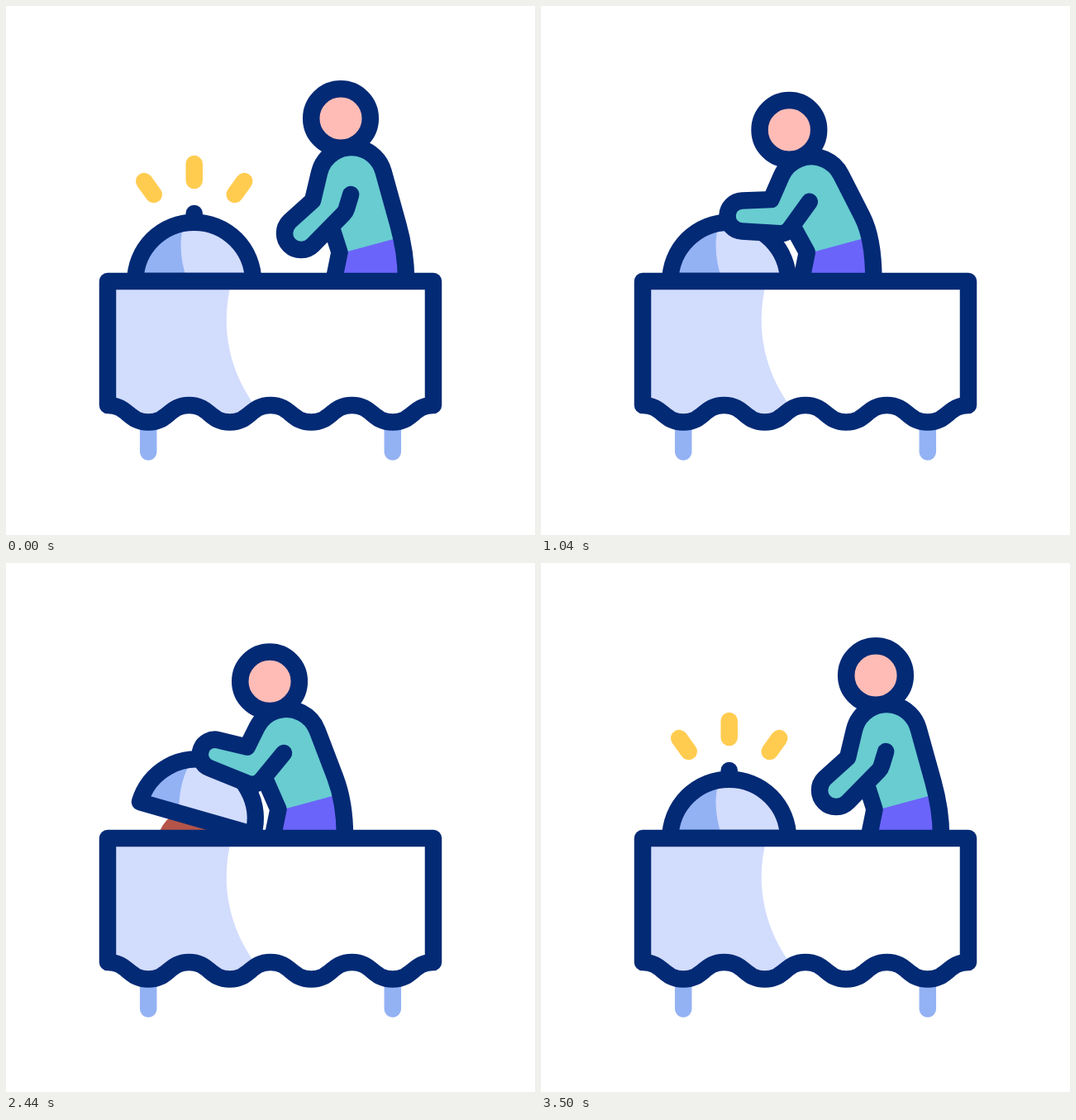
Recreate the animation shown at these times as an HTML page with a canvas. Size 640 px wide and 640 px high, loop 3600 ms.

```html
<!DOCTYPE html>
<html lang="en">
<head>
<meta charset="utf-8">
<title>Buffet</title>
<style>
  html, body { margin: 0; width: 100%; height: 100%; overflow: hidden; background: #fff; }
  canvas { display: block; width: 640px; height: 640px; }
</style>
</head>
<body>
<canvas id="stage" width="640" height="640"></canvas>
<script>
(() => {
const ctx = document.getElementById('stage').getContext('2d');
const LOOP = 3600, END = 3500, GRAB = 1080, RELEASE = 2700;
const LINE = 20.5, MAX_LEAN = 14, RAD = Math.PI / 180;
const NAVY = '#032a75', PALE = '#d2dcfd', BLUE = '#93b2f4', GREEN = '#68ccd1',
      PURPLE = '#6b64fa', SKIN = '#ffbcb6', YELLOW = '#ffcc50', BROWN = '#b55449';

// time, hip x, forward lean, arm direction in degrees
const poses = [
  [0, 484, 0, 133.6],
  [580, 433, 7.5, 144.7],
  [GRAB, 402, MAX_LEAN, 160.5],
  [1440, 430.5, 4.7, 176],
  [1890, 435, 0, 186],
  [2080, 433.5, 1.1, 183.7],
  [2440, 410, 7.2, 170.4],
  [RELEASE, 402, MAX_LEAN, 160.5],
  [2920, 432, 13, 153.6],
  [END, 484, 0, 133.6]
];

const clamp = v => Math.max(0, Math.min(1, v));
const mix = (a, b, k) => a + (b - a) * k;
const polar = ([x, y], r, a) => [x + r * Math.cos(a), y + r * Math.sin(a)];

// Smooth monotone interpolation of one column of the poses
function sample(col, t) {
  let i = 0;
  while (i < poses.length - 2 && t >= poses[i + 1][0]) i++;
  const slope = n => n < 0 || n > poses.length - 2 ? 0
    : (poses[n + 1][col] - poses[n][col]) / (poses[n + 1][0] - poses[n][0]);
  const tangent = n => {
    const a = slope(n - 1), b = slope(n);
    return a * b > 0 ? 2 * a * b / (a + b) : 0;
  };
  const [from, to] = [poses[i], poses[i + 1]];
  const span = to[0] - from[0], u = clamp((t - from[0]) / span);
  return mix(from[col], to[col], u * u * (3 - 2 * u))
    + span * u * (1 - u) * ((1 - u) * tangent(i) - u * tangent(i + 1));
}

function fill(color) { ctx.fillStyle = color; ctx.fill(); }

function stroke(color = NAVY) {
  ctx.strokeStyle = color;
  ctx.lineWidth = LINE;
  ctx.stroke();
}

function trace(...points) {
  ctx.beginPath();
  points.forEach(p => ctx.lineTo(...p));
}

function disc(x, y, r) {
  ctx.beginPath();
  ctx.arc(x, y, r, 0, 2 * Math.PI);
}

// Angle where the line from p touches the circle, on the chosen side
function touch(p, c, r, side) {
  const dx = p[0] - c[0], dy = p[1] - c[1];
  return Math.atan2(dy, dx) + side * Math.acos(Math.min(1, r / Math.hypot(dx, dy)));
}

// Rays shrink towards their outer ends, then grow again from the inner ends
function drawRays(t) {
  for (let i = 0; i < 3; i++) {
    const side = i - 1, tilt = Math.abs(side);
    const inner = [227.7 + side * 49, 211 + tilt * 17];
    const outer = [227.7 + side * 60.5, 191 + tilt * 21];
    const from = t < GRAB ? clamp((t - 60 - 160 * i) / 220) : 0;
    const to = t < GRAB ? 1 : clamp((t - 2840 - 120 * i) / 220);
    if (from >= to) continue;
    trace(...[from, to].map(k => [mix(inner[0], outer[0], k), mix(inner[1], outer[1], k)]));
    stroke(YELLOW);
  }
}

// The lid opens as the person straightens up
function drawLid(t) {
  const held = t > GRAB && t < RELEASE;
  const angle = held ? 33 * (1 - sample(2, t) / MAX_LEAN) : 0;
  const r = 71.3;
  ctx.save();
  ctx.translate(299, 333 - 0.018 * angle * angle);
  ctx.rotate(angle * RAD);
  ctx.translate(-r, 0);
  disc(0, -82, 10.3);
  fill(NAVY);

  const dome = () => {
    ctx.beginPath();
    ctx.arc(0, 0, r, Math.PI, 2 * Math.PI);
    ctx.closePath();
  };
  dome();
  fill(PALE);
  ctx.save();
  ctx.clip();
  const upper = -12 - 11 * clamp(angle / 16), base = -8 - 19 * clamp(angle / 22);
  ctx.beginPath();
  ctx.moveTo(upper, -72);
  ctx.quadraticCurveTo((upper + base) / 2 - 12, -38, base, 0);
  ctx.lineTo(-80, 0);
  ctx.lineTo(-80, -72);
  fill(BLUE);
  ctx.restore();
  dome();
  stroke();
  ctx.restore();
}

function drawPerson(t) {
  const hip = sample(1, t), lean = sample(2, t), aim = sample(3, t);
  const R = 40;
  const head = [hip - 79 - 1.65 * lean, 136 + lean];
  const shoulder = [head[0] + 13 + lean, 211 + 0.8 * lean];
  const waist = [hip - 80.5, 298], armpit = [hip - 92 - 0.6 * lean, 262];
  const seat = [hip, 299 - 1.25 * lean];

  // The whole arm follows from its direction
  const hand = polar(shoulder, 89.5 - 0.004 * (aim - 150) ** 2, aim * RAD);
  const r = 20 - 0.06 * (aim - 134);
  const joint = polar(shoulder, 52 - 0.011 * (165 - aim) ** 2, (81.6 + 0.37 * aim) * RAD);
  const girth = 21 + 0.0028 * (aim - 134) ** 2;
  const bend = (262 - 0.025 * (184 - aim) ** 2) * RAD;
  const elbow = polar(joint, girth, bend), crook = polar(joint, -girth, bend);
  const drop = hand[1] - shoulder[1];
  const sleeve = [shoulder[0] - 4 + 0.05 * drop, shoulder[1] + 12 + 0.08 * drop];

  const leftA = touch(elbow, shoulder, R, 1), rightA = touch(seat, shoulder, R, -1);
  const spine = polar(shoulder, R, rightA);
  const palmA = touch(crook, hand, r, 1), wristA = touch(elbow, hand, r, -1);
  const palm = polar(hand, r, palmA);

  const torsoLine = () => {
    ctx.lineTo(...elbow);
    ctx.arc(...shoulder, R, leftA, rightA);
    ctx.lineTo(mix(spine[0], seat[0], 0.65), mix(spine[1], seat[1], 0.65));
    ctx.quadraticCurveTo(...seat, hip, 330);
  };
  const armLine = () => {
    ctx.moveTo(...sleeve);
    ctx.arcTo(...crook, ...palm, 15);
    ctx.arc(...hand, r, palmA, wristA);
    ctx.lineTo(...elbow);
  };

  ctx.beginPath();
  torsoLine();
  ctx.lineTo(hip - 86, 330);
  ctx.lineTo(...waist);
  ctx.lineTo(...armpit);
  ctx.closePath();
  fill(GREEN);
  trace([hip - 80, 299.4], [hip - 5, 279.3], [hip, 330], [hip - 86, 330]);
  fill(PURPLE);

  trace(armpit, waist, [hip - 87, 330]);
  stroke();
  ctx.beginPath();
  armLine();
  fill(GREEN);
  ctx.beginPath();
  armLine();
  torsoLine();
  stroke();

  disc(...head, 35.8);
  fill(SKIN);
  stroke();
}

function drawTable() {
  const cloth = () => {
    const half = 394 / 8;
    trace([517, 333], [123, 333], [123, 483]);
    for (let i = 0; i < 8; i++) {
      const x = 123 + i * half, a = i % 2 ? 503.5 : 483, b = 986.5 - a;
      ctx.bezierCurveTo(x + half / 2, a, x + half / 2, b, x + half, b);
    }
    ctx.closePath();
  };
  for (const x of [172.2, 467.8]) {
    trace([x, 500], [x, 539.5]);
    stroke(BLUE);
  }
  cloth();
  fill('#fff');
  ctx.save();
  ctx.clip();
  ctx.beginPath();
  ctx.moveTo(273, 333);
  ctx.bezierCurveTo(259, 385, 268, 440, 304, 488);
  ctx.lineTo(304, 520);
  ctx.lineTo(113, 520);
  ctx.lineTo(113, 333);
  fill(PALE);
  ctx.restore();
  cloth();
  stroke();
}

function draw() {
  const t = Math.min(performance.now() % LOOP, END);
  ctx.fillStyle = '#fff';
  ctx.fillRect(0, 0, 640, 640);
  ctx.lineCap = ctx.lineJoin = 'round';
  drawRays(t);
  disc(227.7, 342, 45.2);
  fill(BROWN);
  drawLid(t);
  drawPerson(t);
  drawTable();
  requestAnimationFrame(draw);
}
draw();
})();
</script>
</body>
</html>
```
